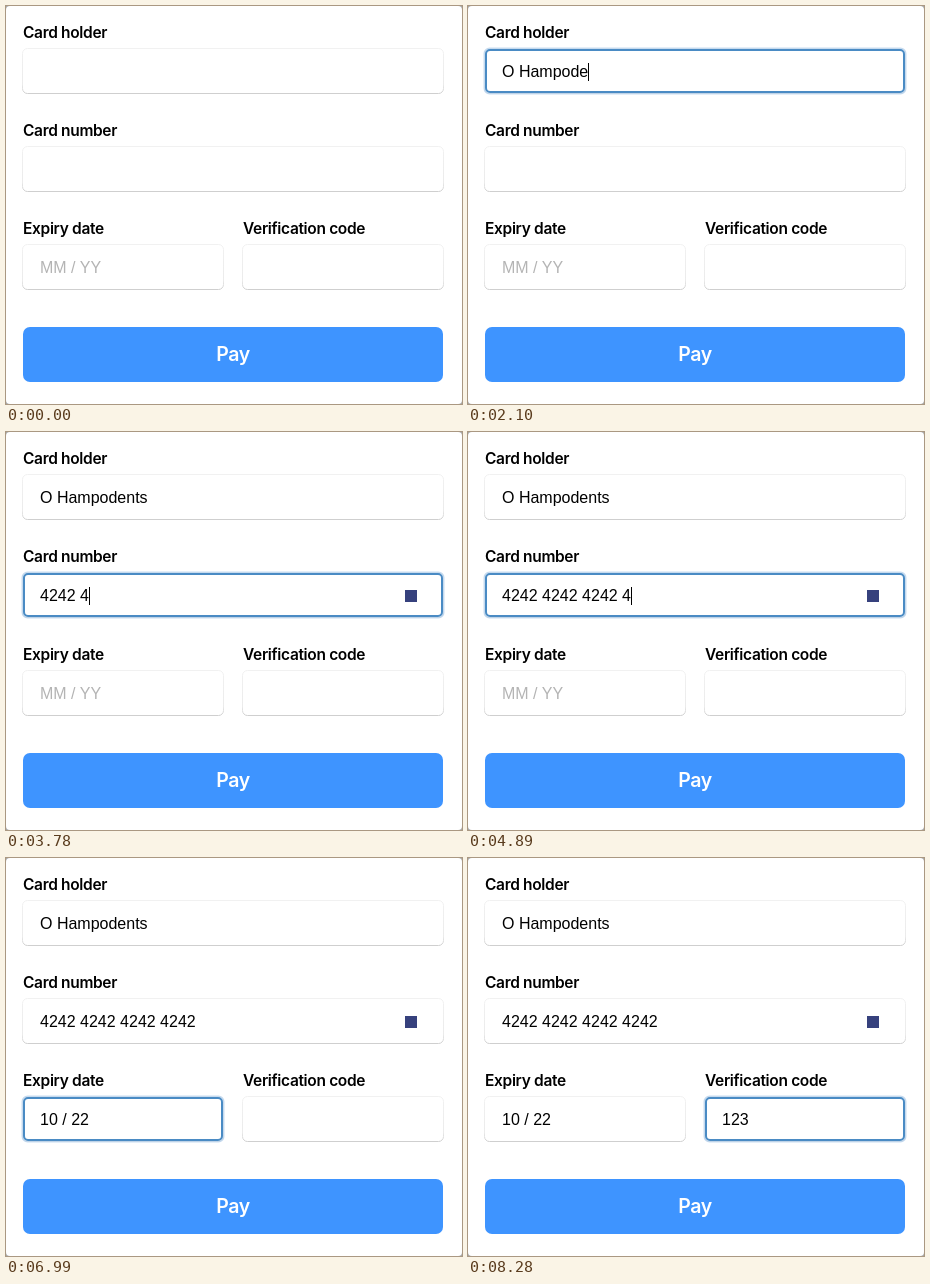
Write an HTML page that moves like this. It is 456x398 px and loops after 8520 ms.

```html
<!DOCTYPE html>
<html lang="en">
<head>
<meta charset="utf-8">
<title>Card payment form</title>
<style>
  html, body { margin: 0; width: 100%; height: 100%; overflow: hidden; background: #fff; }
  svg { display: block; width: 456px; height: 398px; }
  text { white-space: pre; }
  .label { font: 600 15.5px Inter, sans-serif; letter-spacing: -0.33px; }
  .value { font: 16px "Liberation Sans", Arial, sans-serif; }
  .hint { fill: #b4b4b4; }
  .pay { font: 600 19.5px Inter, sans-serif; letter-spacing: -0.4px; fill: #fff; text-anchor: middle; }
</style>
</head>
<body>
<svg id="stage" viewBox="0 0 456 398">
  <defs>
    <linearGradient id="edge" x1="0" y1="0" x2="0" y2="1">
      <stop offset="0" stop-color="#f1f1f1"/>
      <stop offset="0.8" stop-color="#ebebeb"/>
      <stop offset="1" stop-color="#cfcfcf"/>
    </linearGradient>
  </defs>
  <rect width="456" height="398" fill="#a8a8a8"/>
  <rect width="456" height="398" rx="4" fill="#fff"/>
  <g id="form"></g>
  <rect id="brand" x="399" y="158" width="12" height="12" fill="#36417d"/>
  <rect x="17" y="321" width="420" height="55" rx="7" fill="#3e94ff"/>
  <text class="pay" x="227" y="355">Pay</text>
</svg>
<script>
const LOOP = 8520, STEP = 30, BRAND_AT = 3210;
const form = document.getElementById('form');
const brand = document.getElementById('brand');

// keys: time of each key press; on/off: focus span; caretOff: when the caret hides
const fields = [
  {
    label: 'Card holder', x: 17, y: 43, w: 420, on: 30, off: 2610, caretOff: 2580,
    keys: [600, 930, 1230, 1560, 1680, 1770, 1890, 2010, 2100, 2190, 2310, 2430],
    typed: 'O Hampodents', format: s => s
  },
  {
    label: 'Card number', x: 17, y: 141, w: 420, on: 2610, off: 5490, caretOff: 5490,
    keys: [3060, 3330, 3480, 3630, 3780, 3900, 4050, 4200,
           4350, 4470, 4620, 4740, 4890, 5040, 5160, 5250],
    typed: '4242'.repeat(4), format: s => s.replace(/\d{4}/g, '$& ').slice(0, 19)
  },
  {
    label: 'Expiry date', x: 17, y: 239, w: 200, on: 5490, off: 7020, caretOff: 6990,
    keys: [5940, 6150, 6510, 6690],
    typed: '1022', hint: 'MM / YY', format: s => s.replace(/^\d\d/, '$& / ')
  },
  {
    label: 'Verification code', x: 237, y: 239, w: 200, on: 7020, off: LOOP, caretOff: 8280,
    keys: [7470, 7620, 7770],
    typed: '123', format: s => s
  }
];

function add(tag, attrs, content = '') {
  const node = document.createElementNS('http://www.w3.org/2000/svg', tag);
  for (const key in attrs) node.setAttribute(key, attrs[key]);
  node.textContent = content;
  form.appendChild(node);
  return node;
}

function frame(x, y, w, h, rx, stroke, width) {
  return add('rect', { x, y, width: w, height: h, rx, fill: 'none', stroke, 'stroke-width': width });
}

for (const f of fields) {
  const { x, y, w } = f;
  add('text', { class: 'label', x, y: y - 11 }, f.label);
  f.rest = frame(x - 0.5, y - 0.5, w + 1, 45, 5, 'url(#edge)', 1);
  f.glow = frame(x - 0.5, y - 0.5, w + 1, 45, 5, '#bcd5ee', 2);
  f.ring = frame(x + 1, y + 1, w - 2, 42, 4, '#4a8bc4', 2);
  f.text = add('text', { class: 'value', x: x + 17, y: y + 28 });
  f.caret = add('rect', { y: y + 14, width: 1, height: 18 });
}

function show(node, visible) {
  node.setAttribute('visibility', visible ? 'visible' : 'hidden');
}

function draw(t) {
  for (const f of fields) {
    const focused = t >= f.on && t < f.off;
    const fade = focused ? Math.min(1, (Math.floor((t - f.on) / STEP) + 1) / 3) : 0;
    f.ring.setAttribute('opacity', fade);
    f.glow.setAttribute('opacity', fade * 0.8);

    const count = f.keys.filter(k => k <= t).length;
    const value = f.format(f.typed.slice(0, count));
    const content = value || f.hint || '';
    if (f.text.textContent !== content) f.text.textContent = content;
    f.text.classList.toggle('hint', !value);

    const caretOn = focused && t < f.caretOff;
    show(f.caret, caretOn);
    if (caretOn) {
      const width = value ? f.text.getComputedTextLength() : 0;
      f.caret.setAttribute('x', Math.round(f.x + 17 + width));
    }
  }
  show(brand, t >= BRAND_AT);
}

const start = performance.now();
function tick() {
  draw((performance.now() - start) % LOOP);
  requestAnimationFrame(tick);
}
draw(0);
requestAnimationFrame(tick);
</script>
</body>
</html>
```
